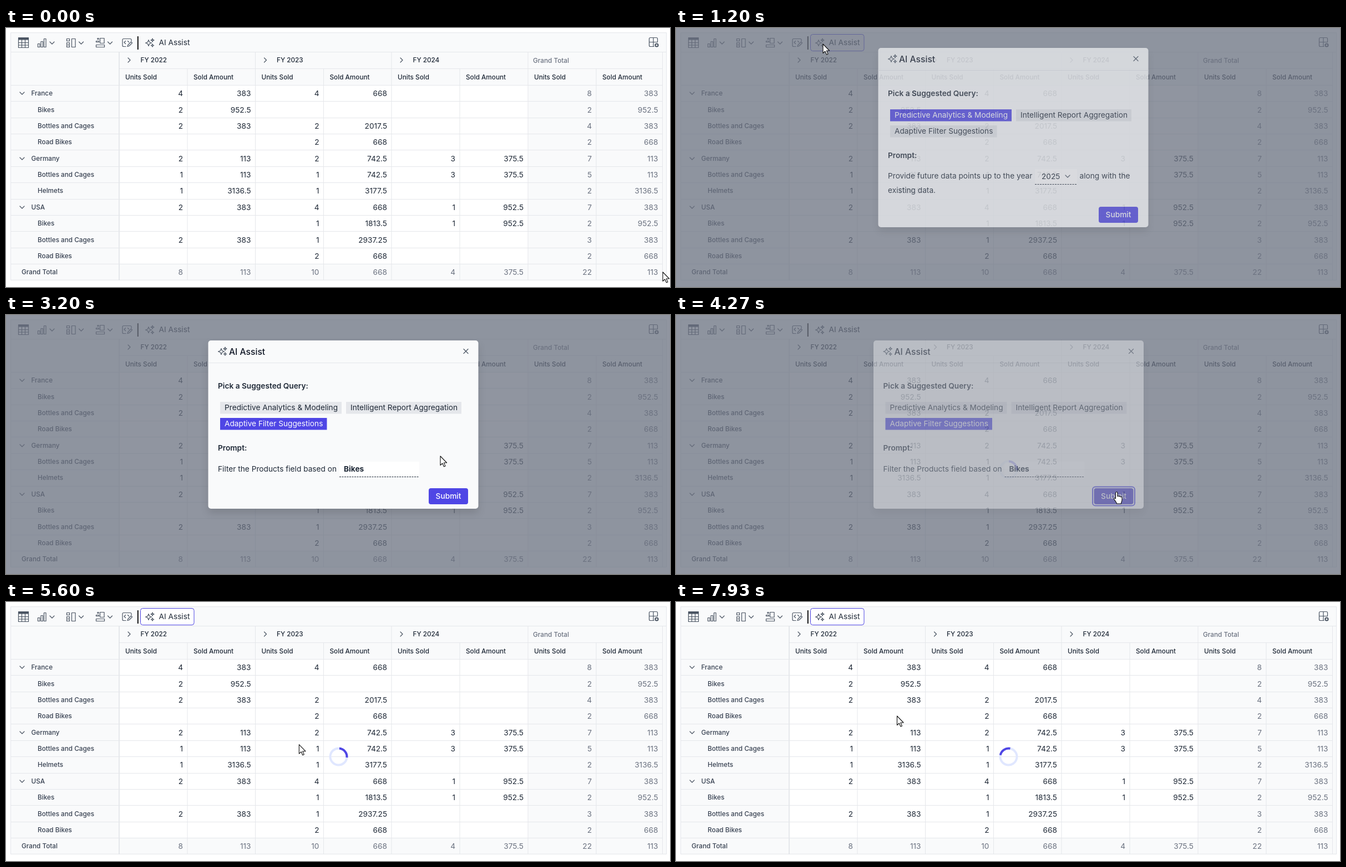
Write an HTML page that moves like this. It is 1197 px wide and 468 px high and loops after 8000 ms.

```html
<!DOCTYPE html>
<html lang="en">
<head>
<meta charset="utf-8">
<title>Pivot table assistant</title>
<style>
  html, body { margin: 0; width: 100%; height: 100%; overflow: hidden; background: #fff; }
  svg { display: block; }
  text { font-family: Inter, sans-serif; white-space: pre; }
  .icon { fill: none; stroke: #4b5563; stroke-width: 1.2; stroke-linecap: round; stroke-linejoin: round; }
  .solid { fill: #374151; }
  .dialog { filter: drop-shadow(0 8px 7px rgb(0 0 0 / .12)); }
  .pointer { fill: #fff; stroke: #111; stroke-width: 1.1; stroke-linejoin: round; }
</style>
</head>
<body>
<svg id="stage" width="1197" height="468" viewBox="0 0 1197 468"></svg>
<script>
const LOOP = 8000, FPS = 15;
const INK = '#1f2937', MUTED = '#6b7280', LINE = '#e5e7eb', PANEL = '#f9fafb', ACCENT = '#4f46e5';
const SMALL = 11.75, BODY = 13.7, LARGE = 15.66;

const rect = (x, y, w, h, fill, extra = '') =>
  `<rect x="${x}" y="${y}" width="${w}" height="${h}" fill="${fill}" ${extra}/>`;
const line = (x1, y1, x2, y2, color = LINE, extra = '') =>
  `<path d="M${x1} ${y1}L${x2} ${y2}" stroke="${color}" ${extra}/>`;
const icon = (d, extra = '') => `<path class="icon" d="${d}" ${extra}/>`;
// y is the middle of the capital letters
const text = (x, y, label, size = SMALL, weight = 500, fill = INK, anchor = 'start') =>
  `<text x="${x}" y="${y + size * 0.36}" font-size="${size}" font-weight="${weight}" fill="${fill}" text-anchor="${anchor}">${label}</text>`;
const chevronDown = (x, y) => icon(`M${x - 4} ${y - 2}l4 4 4-4`, 'stroke-width="1.5"');
const chevronRight = (x, y) => icon(`M${x - 2} ${y - 4}l4 4-4 4`, 'stroke-width="1.5"');
const star = (x, y, r) => {
  const q = r * 0.28;
  return `M${x} ${y - r}l${q} ${r - q} ${r - q} ${q} ${q - r} ${q} ${-q} ${r - q} ${-q} ${q - r} ${q - r} ${-q} ${r - q} ${-q}Z`;
};
const sparkle = (x, y) => icon(star(x - 2, y + .5, 5.5) + star(x + 5, y - 4.5, 3) + star(x + 5, y + 5, 2.6));

const columns = [204, 327, 449.5, 572.5, 695, 818, 941, 1064, 1183.5];
const rows = [
  'France,4,383,4,668,,,8,383',
  ' Bikes,2,952.5,,,,,2,952.5',
  ' Bottles and Cages,2,383,2,2017.5,,,4,383',
  ' Road Bikes,,,2,668,,,2,668',
  'Germany,2,113,2,742.5,3,375.5,7,113',
  ' Bottles and Cages,1,113,1,742.5,3,375.5,5,113',
  ' Helmets,1,3136.5,1,3177.5,,,2,3136.5',
  'USA,2,383,4,668,1,952.5,7,383',
  ' Bikes,,,1,1813.5,1,952.5,2,952.5',
  ' Bottles and Cages,2,383,1,2937.25,,,3,383',
  ' Road Bikes,,,2,668,,,2,668',
  'Grand Total,8,113,10,668,4,375.5,22,113',
];

function toolbar() {
  return icon('M22.5 17.5h18v18h-18ZM22.5 26.5h18M22.5 31h18M28.5 20v15.500M34.500 20v15.500') +
    rect(22, 17, 19, 4.5, '#4b5563') +
    icon('M57.500 28.500h3.500v6h-3.500ZM63 24.500h3.500v10H63ZM68.500 19.500h3.500v15h-3.500Z', 'stroke="#6b7280"') +
    icon('M109.500 19.500h5v4h-5ZM109.500 26.500h5v8h-5ZM118.500 19.500h6.500v15h-6.500ZM112 29v3') +
    icon('M162.500 25.500v-2h5v2ZM169.500 18.500h7.500v9h-7.500ZM162.500 30.500h15v4h-15ZM165 18.500h2v2h-2Z') +
    [83, 135.5, 187.5].map(x => chevronDown(x, 27)).join('') +
    icon('M216 33.500h-4a2 2 0 0 1-2-2v-10a2 2 0 0 1 2-2h12a2 2 0 0 1 2 2v2M215.500 23.500l-2.500 2.500 2.500 2.500M219.500 23.500l2 2M219 33.500l1-3 5.500-5.500 2 2-5.500 5.500Z') +
    rect(236.8, 15, 2, 24, '#111') +
    rect(242.5, 11.5, 96.500, 30, 'none', 'id="assist" rx="4"') +
    sparkle(259, 26.5) + text(275.5, 26.5, 'AI Assist', BODY, 400) +
    icon('M1168 33.500h-6.500a2 2 0 0 1-2-2v-12a2 2 0 0 1 2-2h11a2 2 0 0 1 2 2V25M1159.500 25.500h15M1167 17.500v16') +
    `<circle cx="1173" cy="31" r="2.600" fill="none" stroke="#4b5563" stroke-width="2"/>`;
}

function table() {
  const bottom = 455.500, rowTop = i => Math.round(103 + 29.36 * i) + .5;
  let out = rect(8.500, 8.500, 1182, 447, PANEL, `stroke="${LINE}"`) +
    rect(204, 103.5, 737, rowTop(11) - 103.5, '#fff') + line(8, 43.5, 1190, 43.5) + line(204, 73.5, 1184, 73.5);
  columns.forEach((x, i) => {
    out += line(x, i % 2 ? 73.5 : 43.5, x, bottom, i ? LINE : '#d1d5db');
    if (i < 8) out += text(x + 11, 88.5, i % 2 ? 'Sold Amount' : 'Units Sold');
  });
  ['FY 2022', 'FY 2023', 'FY 2024'].forEach((year, i) => {
    const x = columns[i * 2];
    out += chevronRight(x + 18, 58) + text(x + 38.5, 57.5, year);
  });
  out += text(950, 59, 'Grand Total', SMALL, 500, MUTED);
  rows.forEach((row, r) => {
    const [name, ...cells] = row.split(',');
    const y = Math.round(118.3 + 29.36 * r), last = r === rows.length - 1, child = name[0] === ' ';
    out += line(8, rowTop(r), 1184, rowTop(r));
    if (!child && !last) out += chevronDown(29, y);
    out += text(last ? 28 : child ? 57 : 45.5, y, name.trim(), SMALL, 500, '#374151');
    cells.forEach((cell, c) => {
      out += text(columns[c + 1] - 8, y, cell, BODY, 400, last || c > 5 ? MUTED : INK, 'end');
    });
  });
  return out;
}

function chip(x, y, w, label, active) {
  return rect(x, y, w, 21.5, active ? ACCENT : LINE) +
    text(x + 8, y + 10.5, label, BODY, 400, active ? '#fff' : INK);
}

function field(x, y, w, value, weight) {
  return rect(x, y, w, 27, '#fff') + line(x, y + 27.5, x + w, y + 27.5, INK, 'stroke-dasharray="3 1.500"') +
    text(x + (weight > 400 ? 8 : 12), y + 13.5, value, BODY, weight);
}

function dialog(id, top, height, active, prompt) {
  const submitY = height - 37;
  return `<g id="${id}" class="dialog" transform="translate(0 ${top})">` +
    rect(364.5, 0, 487, height, PANEL, 'rx="5"') + line(364.5, 40.5, 851.5, 40.5) +
    sparkle(390, 19.500) + text(402, 20.5, 'AI Assist', LARGE, 500, '#111827') +
    icon('M825 15.500l8 8m0-8l-8 8') +
    text(382, 82, 'Pick a Suggested Query:', BODY, 600) +
    chip(386, 111, 219, 'Predictive Analytics &amp; Modeling', active === 0) +
    chip(613, 111, 208, 'Intelligent Report Aggregation') +
    `<g class="suggestions">${chip(386, 140, 192.500, 'Adaptive Filter Suggestions', active === 2)}</g>` +
    text(382, 194.500, 'Prompt:', BODY, 600) + prompt +
    rect(759.5, submitY - 2.500, 76, 34, 'none', `class="ring" rx="5" stroke="${ACCENT}" stroke-width="2"`) +
    rect(762, submitY, 71, 29, ACCENT, 'class="submit" rx="4"') +
    text(797.500, submitY + 14.500, 'Submit', BODY, 500, '#fff', 'middle') + '</g>';
}

const stage = document.getElementById('stage');
stage.innerHTML = table() + toolbar() +
  `<g id="spinner" fill="none" stroke-width="4"><circle r="15" stroke="#e0e7ff"/>
   <path d="M10.600-10.600A15 15 0 0 1 10.600 10.600" stroke="${ACCENT}"/></g>` +
  rect(0, 0, 1197, 468, 'rgb(107 114 128 / .75)', 'id="overlay"') +
  '<g id="dialogs">' +
  dialog('predict', 36, 324, 0,
    text(382, 231.500, 'Provide future data points up to the year', BODY, 400) +
    field(647, 219, 76, '2025', 400) + chevronDown(706, 232) +
    text(727.5, 231.500, 'along with the', BODY, 400) + text(382, 257.500, 'existing data.', BODY, 400)) +
  dialog('filter', 46, 304, 2,
    text(382, 232.500, 'Filter the Products field based on', BODY, 400) + field(601, 219, 144, 'Bikes', 700)) +
  `</g><g id="cursor">
   <path id="arrow" class="pointer" d="M0 0V16.500L3.800 13 6.500 19 9 17.900 6.400 12H11.600Z"/>
   <path id="hand" class="pointer" transform="translate(-6 -1)" d="M4 13V2.500a1.700 1.700 0 0 1 3.400 0V9c0-1.600 2.800-1.600 3 .3 .3-1.300 2.600-1.100 2.700.7 .4-1 2.400-.7 2.400 1V15c0 3-1.600 4-1.600 7H6c0-2-2.600-4.500-4.800-8.300-1-1.900 1.200-2.800 2.800-.7Z"/></g>`;

// time, x, y
const path = [
  [0, 1184, 441], [40, 1184, 441], [600, 265, 29], [1400, 265, 29], [1870, 769, 255],
  [1900, 769, 255], [2200, 546, 196], [3030, 546, 196], [3190, 783, 255], [3330, 783, 255],
  [3800, 794.5, 320], [4580, 794.5, 320], [4830, 520, 345], [5060, 300, 361], [5300, 300, 361],
  [5670, 552, 247], [5730, 552.5, 239], [6930, 552.5, 239], [7400, 471, 215], [7930, 398.5, 206], [LOOP, 398.5, 206],
];

function cursorAt(t) {
  const i = path.findIndex(p => p[0] > t), [t0, x0, y0] = path[i - 1], [t1, x1, y1] = path[i];
  const p = (t - t0) / (t1 - t0), e = p * p * (3 - 2 * p);
  return [x0 + (x1 - x0) * e, y0 + (y1 - y0) * e];
}

const $ = selector => stage.querySelector(selector);
const set = (selector, attributes) => {
  for (const name in attributes) $(selector).setAttribute(name, attributes[name]);
};
const show = (selector, visible) => set(selector, { display: visible ? 'inline' : 'none' });
const within = (t, from, to) => t >= from && t < to;
const fade = p => 1 - (1 - Math.min(1, Math.max(0, p))) ** 2.2;

const OPEN = 1045, PICK = 2395, SUBMIT = 3990, CLOSE = 4130, FADE = 400;

function render(t) {
  const focused = within(t, OPEN, PICK) || t >= 4550;
  const hovered = within(t, 500, 1800);
  set('#assist', { stroke: focused ? ACCENT : 'none', fill: hovered ? '#f3f4f6' : focused ? '#fff' : 'none' });

  const open = within(t, OPEN, CLOSE + FADE);
  show('#overlay', open);
  show('#dialogs', open);
  set('#dialogs', {
    opacity: t < CLOSE ? fade((t - OPEN) / FADE) : 1 - fade((t - CLOSE) / FADE),
    transform: `translate(${t < CLOSE ? 0 : -8.500} 0)`,
  });
  show('#predict', t < PICK);
  show('#filter', t >= PICK);
  show('#predict .ring', false);
  show('#filter .ring', t >= SUBMIT);
  set('#predict .suggestions rect', { fill: t >= 2130 ? '#d1d5db' : LINE });
  set('#filter .submit', { fill: t >= 3500 ? '#4338ca' : ACCENT });

  show('#spinner', t >= CLOSE);
  set('#spinner', { transform: `translate(599.500 279.500) rotate(${30 + (t - 4533) * 0.2724})` });

  const hand = within(t, 2130, 3080) || within(t, 3500, 4620);
  set('#cursor', { transform: `translate(${cursorAt(t)})` });
  show('#hand', hand);
  show('#arrow', !hand);
}

function tick() {
  const t = performance.now() % LOOP;
  render(Math.min(Math.floor((t + 5) * FPS / 1000) * 1000 / FPS, LOOP - 1));
  requestAnimationFrame(tick);
}
tick();
</script>
</body>
</html>
```
